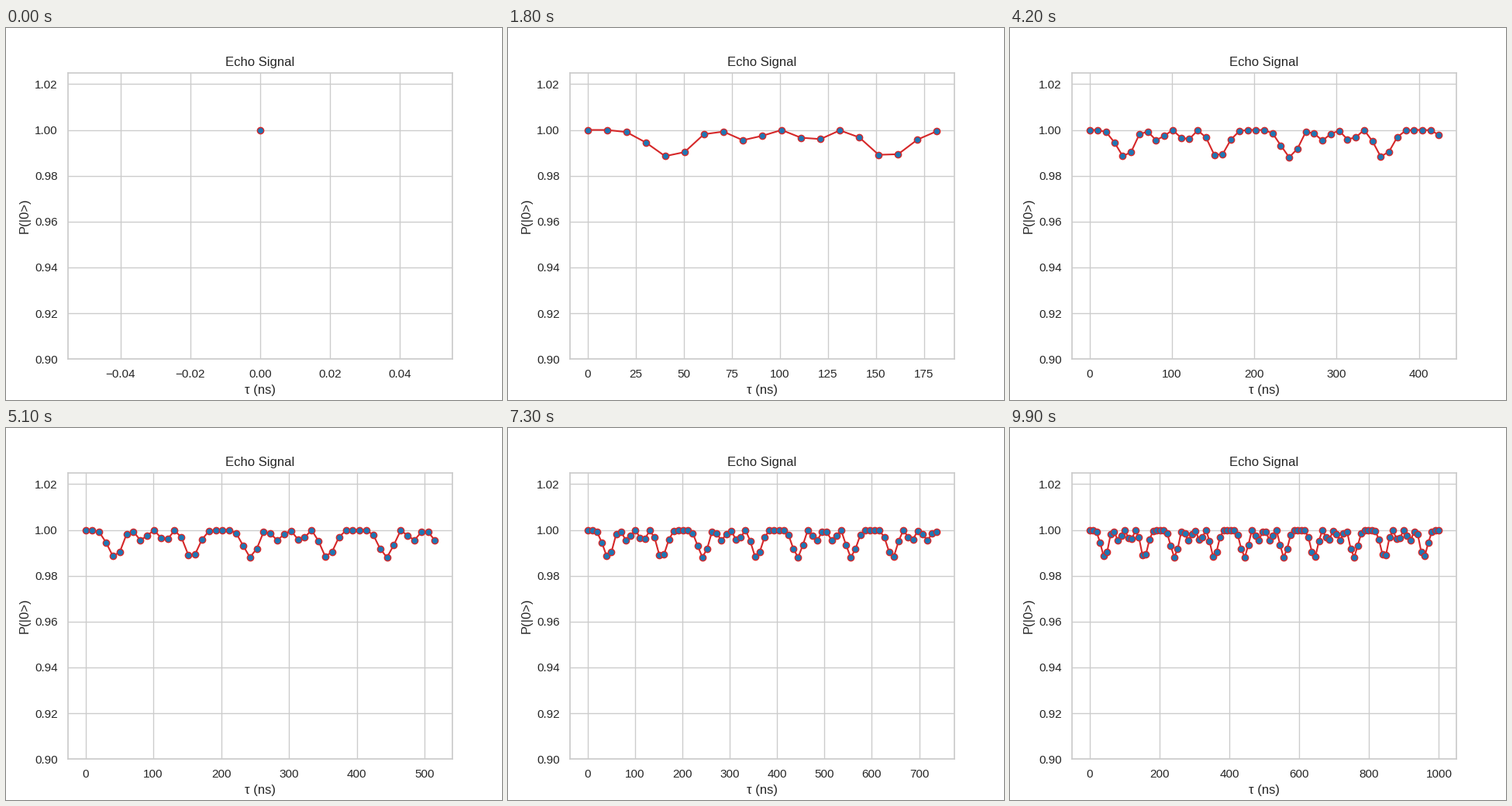
Recreate the animation shown at these times as a matplotlib script. Size 640 px wide and 480 px high, loop 10 s.

```python
import numpy as np
import matplotlib.pyplot as plt
from matplotlib.animation import FuncAnimation

INK, GRID = "0.15", "0.8"
FRAMES = 100

plt.rcParams.update({
    "font.family": "Liberation Sans",
    "font.size": 12,
    "text.color": INK,
    "axes.labelcolor": INK,
    "axes.edgecolor": GRID,
    "axes.linewidth": 1.25,
    "axes.grid": True,
    "axes.axisbelow": True,
    "axes.titlesize": 12,
    "axes.labelsize": 12,
    "grid.color": GRID,
    "grid.linewidth": 1,
    "lines.solid_capstyle": "round",
})
for axis in ("xtick", "ytick"):
    plt.rcParams.update({
        f"{axis}.color": INK,
        f"{axis}.labelsize": 11,
        f"{axis}.major.size": 6,
        f"{axis}.major.width": 1.25,
    })
plt.rcParams.update({"xtick.bottom": False, "ytick.left": False})


def echo(tau, depth=0.04, period=200):
    """Echo population: a product of three commensurate modulations."""
    phase = np.pi * tau / period
    return 1 - depth * (np.sin(phase) * np.sin(2 * phase) * np.sin(3 * phase)) ** 2


tau = np.linspace(0, 1000, FRAMES)
signal = echo(tau)

fig, ax = plt.subplots(figsize=(6.4, 4.8), dpi=100)
line, = ax.plot([], [], "o-", color="tab:red", lw=1.5, ms=6,
                mfc="tab:blue", mec="tab:red", mew=1)
ax.set_title("Echo Signal")
ax.set_xlabel("τ (ns)")
ax.set_ylabel("P(|0>)")
ax.set_ylim(0.9, 1.025)


def draw(i):
    line.set_data(tau[:i + 1], signal[:i + 1])
    ax.relim()
    ax.autoscale_view(scaley=False)
    return line,


anim = FuncAnimation(fig, draw, frames=FRAMES, interval=100,
                     init_func=lambda: draw(0), repeat=True, repeat_delay=0)
plt.show()
```
